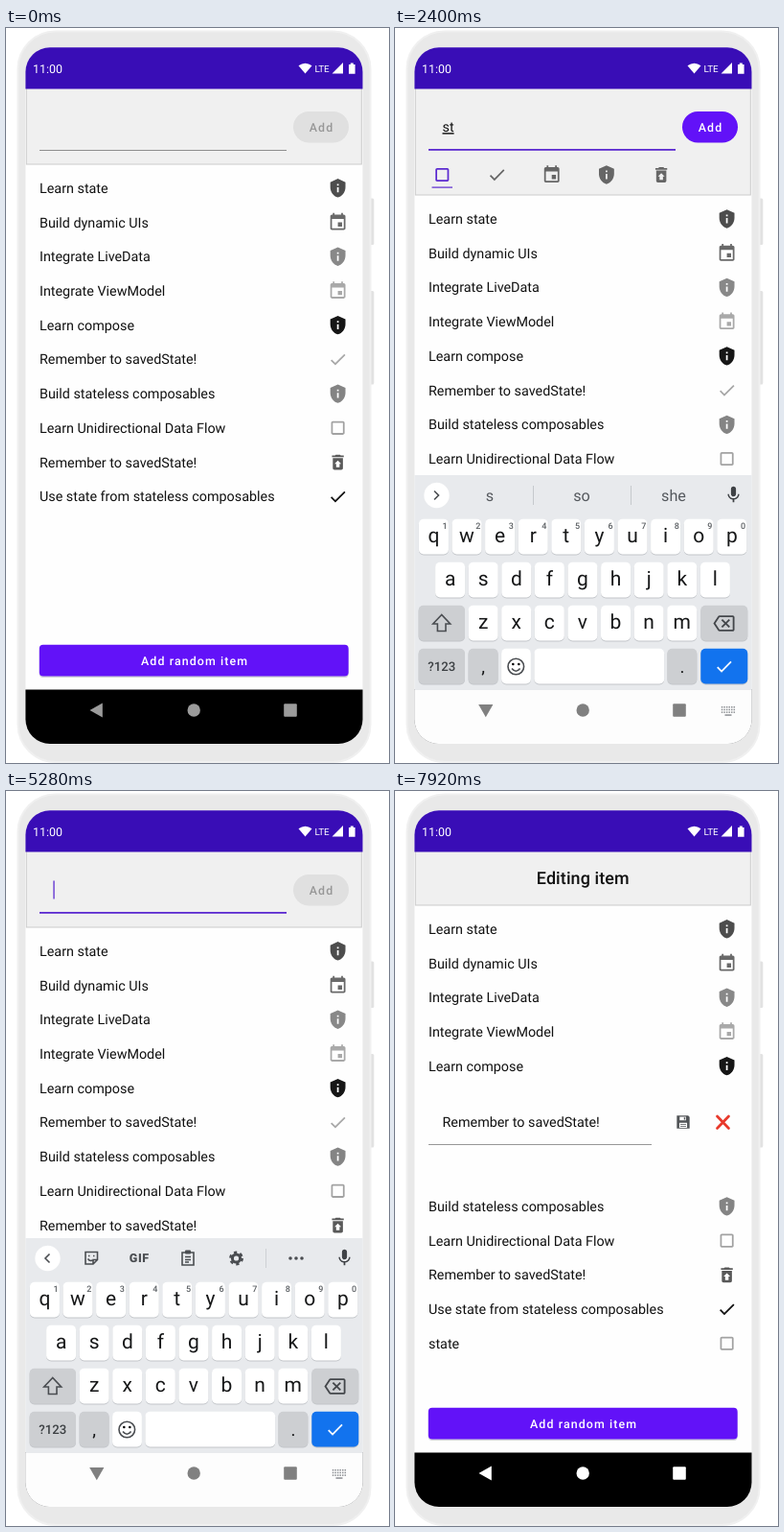
These frames come from a looping animation (400 by 766 pixels, 8 s). An HTML page:

```html
<!DOCTYPE html>
<html lang="en">
<head>
<meta charset="utf-8">
<title>Todo list</title>
<style>
  html, body { margin: 0; width: 100%; height: 100%; overflow: hidden; background: #fff; }
  svg { display: block; width: 400px; height: 766px; }
  text { font-family: Roboto, "Noto Sans", sans-serif; white-space: pre; text-rendering: geometricPrecision; }
  .body { font-size: 14.35px; fill: #111; }
  .btn { font-size: 12.4px; font-weight: 500; letter-spacing: 1.1px; }
  .mid { text-anchor: middle; }
  .key { font-size: 21px; fill: #161718; }
  .num { font-size: 9px; font-weight: 500; fill: #5c6064; }
  .hint { font-size: 16.2px; fill: #55595e; }
  .line { fill: none; stroke: #4a4d51; stroke-width: 1.6; }
  #typed { text-decoration: underline; }
</style>
</head>
<body>
<svg id="stage" viewBox="0 0 400 766" xmlns="http://www.w3.org/2000/svg"></svg>
<script>
const PURPLE = '#6212f8', ACCENT = '#5c2bd0', LOOP = 8000, STEP = 35.72;

const icons = {
  shield: 'M12 1L3 5v6c0 5.55 3.84 10.74 9 12 5.16-1.26 9-6.45 9-12V5l-9-4zm-1 6h2v2h-2V7zm0 4h2v6h-2v-6z',
  event: 'M17 12h-5v5h5v-5zM16 1v2H8V1H6v2H5c-1.11 0-1.99.9-1.99 2L3 19c0 1.1.89 2 2 2h14c1.1 0 2-.9 2-2V5c0-1.1-.9-2-2-2h-1V1h-2zm3 18H5V8h14v11z',
  done: 'M9 16.2L4.8 12l-1.4 1.4L9 19 21 7l-1.4-1.4L9 16.2z',
  square: 'M18 4H6c-1.1 0-2 .9-2 2v12c0 1.1.9 2 2 2h12c1.1 0 2-.9 2-2V6c0-1.1-.9-2-2-2zm0 14H6V6h12v12z',
  trash: 'M19 4h-3.5l-1-1h-5l-1 1H5v2h14V4zM6 7v12c0 1.1.9 2 2 2h8c1.1 0 2-.9 2-2V7H6zm8 7v4h-4v-4H8l4-4 4 4h-2z',
  save: 'M5 3h14l2 2v16H3V3zM7 4.5v5h9v-5zM13 5.5h2v3h-2zM6.5 13v7h11v-7zM8 15h8v1H8zM8 17.5h8v1H8z',
  mic: 'M12 14c1.66 0 3-1.34 3-3V5c0-1.66-1.34-3-3-3S9 3.34 9 5v6c0 1.66 1.34 3 3 3zm5.3-3c0 3-2.54 5.1-5.3 5.1S6.7 14 6.7 11H5c0 3.41 2.72 6.23 6 6.72V21h2v-3.28c3.28-.48 6-3.3 6-6.72h-1.7z',
  erase: 'M22 3H7c-.69 0-1.23.35-1.59.88L0 12l5.41 8.11c.36.53.9.89 1.59.89h15c1.1 0 2-.9 2-2V5c0-1.1-.9-2-2-2zm0 16H7.07L2.4 12l4.66-7H22v14zm-11.59-2L14 13.41 17.59 17 19 15.59 15.41 12 19 8.41 17.59 7 14 10.59 10.41 7 9 8.41 12.59 12 9 15.59z'
};

const items = [
  ['Learn state', 'shield', '#4d4d4d'],
  ['Build dynamic UIs', 'event', '#696969'],
  ['Integrate LiveData', 'shield', '#888'],
  ['Integrate ViewModel', 'event', '#a9a9a9'],
  ['Learn compose', 'shield', '#161616'],
  ['Remember to savedState!', 'done', '#a8a8a8'],
  ['Build stateless composables', 'shield', '#848484'],
  ['Learn Unidirectional Data Flow', 'square', '#a2a2a2'],
  ['Remember to savedState!', 'trash', '#595959'],
  ['Use state from stateless composables', 'done', '#111'],
  ['state', 'square', '#a2a2a2']
];

// ---- drawing helpers ----
const icon = (name, x, y, fill, s = .88) =>
  `<path d="${icons[name]}" fill="${fill}" fill-rule="evenodd" transform="translate(${x - 12 * s} ${y - 12 * s}) scale(${s})"/>`;
const text = (x, y, str, cls, extra = '') => `<text x="${x}" y="${y}" class="${cls}" ${extra}>${str}</text>`;
const rect = (x, y, w, h, fill, r = 0, extra = '') =>
  `<rect x="${x}" y="${y}" width="${w}" height="${h}" rx="${r}" fill="${fill}" ${extra}/>`;
const keycap = (x, y, w, fill = '#fff', id = '') =>
  rect(x, y + 1, w, 36.6, '#c3c6ca', 5) + rect(x, y, w, 36.6, fill, 5, id && `id="key-${id}"`);

function letterRow(str, x0, y, nums) {
  return [...str].map((c, i) => {
    const x = x0 + i * 34.6;
    return keycap(x - 15.5, y, 31, '#fff', c) + text(x, y + 24.3, c, 'key mid') +
      (nums ? text(x + 11.7, y + 9.7, (i + 1) % 10, 'num mid') : '');
  }).join('');
}

function rows() {
  return items.map(([label, name, fill], i) =>
    `<g id="row${i}">${text(35, 5, label, 'body')}${icon(name, 346.6, 0, fill)}</g>`).join('');
}

function tabs() {
  return ['square', 'done', 'event', 'shield', 'trash'].map((name, i) =>
    icon(name, 49.3 + i * 57.2, 153, i ? '#666' : ACCENT)).join('') + rect(38.5, 165.5, 21.5, 1.2, ACCENT);
}

function toolbar() {
  return `<g id="tools">
    <path class="line" d="M45.5 482.5l-4.5 4.5 4.5 4.5"/>
    <path class="line" d="M83 480.5h12.5v8l-4.5 4.5H83zM95.500 488.500h-4.500v4.500M85.500 487.500q2 3 4.500 1.500"/>
    <path class="line" d="M86 484.500h1.500M91 484.500h1.500"/>
    ${text(139.3, 491, 'GIF', 'mid', 'font-size="12.500" font-weight="800" letter-spacing=".6" fill="#4a4d51"')}
    <path class="line" d="M184 481h12v13h-12zM187 485.500h6M187 488.500h6M187 491h4"/>${rect(187, 478.5, 6, 4, '#4a4d51', 1)}
    <circle class="line" cx="240.500" cy="487" r="4.100" style="stroke-width:3"/>
    <circle class="line" cx="240.500" cy="487" r="6.200" style="stroke-width:2.400" stroke-dasharray="3.240 3.250"/>
    ${rect(271, 477, 1, 20, '#cdd0d4')}
    ${[297, 303, 309].map(x => `<circle cx="${x}" cy="487" r="1.800" fill="#4a4d51"/>`).join('')}
  </g>`;
}

function hints() {
  return `<g id="hints"><path class="line" d="M41 482.500l4.500 4.500-4.500 4.500"/>
    ${[99, 195, 291].map((x, i) => text(x, 493, '', 'hint mid', `id="hint${i}"`)).join('')}
    ${rect(144, 477, 1, 20, '#c6c9cd')}${rect(246, 477, 1, 20, '#c6c9cd')}</g>`;
}

function keyboard() {
  const gray = '#cdcfd2';
  return `<g id="kb">${rect(20, 466, 354, 300, '#e8eaed')}${rect(20, 690, 354, 300, '#fdfdfd')}
    <circle cx="43.500" cy="487" r="13.200" fill="#fff"/>${toolbar()}${hints()}
    ${icon('mic', 353.5, 486.5, '#3f4246', .87)}
    ${letterRow('qwertyuiop', 40.4, 511.8, true)}${letterRow('asdfghjkl', 57.6, 556.8)}
    ${keycap(24.6, 601.8, 48.4, gray)}${letterRow('zxcvbnm', 92.1, 601.8)}${keycap(319.3, 601.8, 49, gray)}
    <path class="line" d="M48.700 611.500l-9 9.500h4.700v7.500h8.600v-7.500h4.700z"/>
    ${icon('erase', 343.5, 620.5, '#44474b', .92)}
    ${keycap(24.6, 646.8, 48.4, gray)}${text(48.7, 670, '?123', 'mid', 'font-size="13.200" font-weight="500" fill="#3c4043"')}
    ${keycap(76.6, 646.8, 31, gray)}${text(92.1, 671.5, ',', 'key mid', 'style="font-size:19px"')}
    ${keycap(111.1, 646.8, 30.8)}<circle class="line" cx="126.300" cy="665.500" r="8.300"/>
    <path class="line" d="M122 667.500q4.300 5.500 8.600 0"/><circle cx="123.300" cy="663" r="1.300"/><circle cx="129.300" cy="663" r="1.300"/>
    ${keycap(145.4, 646.8, 135.8)}
    ${keycap(284.4, 646.8, 31, gray)}${text(300, 671.5, '.', 'key mid', 'style="font-size:19px"')}
    ${keycap(319.3, 646.8, 49, '#1273ee')}${icon('done', 343.7, 665.5, '#fff', .88)}
    ${[0, 1, 2].map(r => [0, 1, 2, 3, 4, 5].map(c =>
      rect(340.8 + c * 2.55, 707 + r * 2.7, 1.5, 1.5, '#8d9094')).join('')).join('')}
    ${rect(344.5, 715.3, 7, 1.5, '#8d9094')}</g>`;
}

document.getElementById('stage').innerHTML = `
  <defs>
    <clipPath id="screen"><rect x="20.400" y="20.200" width="352.100" height="725.700" rx="25.500"/></clipPath>
    <clipPath id="rowClip"><rect x="21" y="327.500" width="351" height="35.700"/></clipPath>
    <clipPath id="addClip"><rect x="300" y="87" width="58" height="32.500" rx="16.200"/></clipPath>
  </defs>
  ${rect(379, 177.5, 5.3, 48.5, '#e2e2e2', 1.5)}${rect(379, 274, 5.3, 97.5, '#e2e2e2', 1.5)}
  ${rect(12.5, 3.5, 368, 761.5, '#e9e9e9', 39, 'stroke="#f0f0f0" stroke-width="2"')}
  <g clip-path="url(#screen)">
    ${rect(20, 20, 354, 728, '#fefefe')}
    <circle id="rowRipple" cx="120" cy="345" fill="#000" fill-opacity=".1" clip-path="url(#rowClip)"/>
    ${rows()}
    <rect id="head" x="21.300" y="60" width="350" fill="#f0f0f0" stroke="#cbcbcb"/>
    <g id="entry">
      <rect id="rule" x="35" width="258"/>
      <text id="typed" x="49.500" y="108.200" class="body"></text>
      <rect id="caret" y="93.500" width="1.300" height="19" fill="${ACCENT}"/>
      <rect id="addBox" x="300" y="87" width="58" height="32.500" rx="16.200"/>
      <circle id="addRipple" cx="329" cy="103" fill="#fff" fill-opacity=".28" clip-path="url(#addClip)"/>
      ${text(329.5, 107.8, 'Add', 'btn mid', 'id="addText"')}
      <g id="tabs">${tabs()}</g>
    </g>
    <g id="edit">
      ${text(196.3, 97.2, 'Editing item', 'mid', 'font-size="17.900" font-weight="500" letter-spacing=".13" fill="#111"')}
      ${text(49.5, 350.3, 'Remember to savedState!', 'body')}
      ${rect(35, 368, 233, 1, '#979797')}
      ${icon('save', 301, 345, '#505356', .74)}
      <path d="M336.500 339l12 12.500M348.500 339l-12 12.500" stroke="#e8392b" stroke-width="2.700" stroke-linecap="round"/>
    </g>
    ${rect(34.8, 645, 322.9, 32, '#d4d4da', 4)}${rect(34.8, 642.7, 322.9, 32.7, PURPLE, 4)}
    ${text(197.1, 664, 'Add random item', 'btn mid', 'fill="#fff"')}
    ${rect(20, 689.5, 354, 60, '#000')}
    ${keyboard()}
    <g id="nav">
      <path id="back" d="M87.500 711l13.300-7.600v15.200z"/>
      <circle cx="196.200" cy="711" r="6.700"/><rect x="290.200" y="704.200" width="13.600" height="13.600" rx="1"/>
    </g>
    ${rect(20, 20, 354, 43.5, '#390db6')}
    ${text(28, 46.7, '11:00', '', 'font-size="12.400" fill="#fff"')}
    <path d="M305.500 39.300q7-5 14 0l-7 8.200z" fill="#fff"/>
    ${text(322.6, 45.9, 'LTE', '', 'font-size="9.900" letter-spacing="-.3" fill="#fff"')}
    <path d="M352 36v11.500h-11.500zM358 38h1.800v-1.500h3V38h1.800v9.800H358z" fill="#fff"/>
  </g>`;

// ---- timeline ----
const el = id => document.getElementById(id);
const set = (id, attrs) => { for (const k in attrs) el(id).setAttribute(k, attrs[k]); };
const show = (id, on) => set(id, { opacity: +on });
const ramp = (t, a, b) => Math.min(1, Math.max(0, (t - a) / (b - a)));
const easeOut = p => 1 - (1 - p) ** 3;
const last = (list, t) => list.filter(e => e[0] <= t).pop();

const FOCUS = 120, ROW_ON = 1500, CLEAR = 4960, ROW_OFF = 5060, EDIT = 7800;
const typing = [[0, ''], [FOCUS, ''], [ROW_ON, 's'], [1880, 'st'], [2640, 'sta'], [3620, 'stat'], [3930, 'state'], [CLEAR, '']];
const guesses = [[0, 's so she'], [3000, 'sta stay start'], [3720, 'stat state stay'], [4080, 'state states statement']];
const presses = [['s', 1440], ['t', 1820], ['a', 2600], ['t', 3580], ['e', 3880]];
const widths = { '': 0, s: 7.4, st: 12.1, sta: 19.9, stat: 24.2, state: 31.8 };

function render(t) {
  const editing = t >= EDIT, focused = t >= FOCUS;
  const tabsOpen = t >= ROW_ON && t < ROW_OFF;
  const [since, word] = last(typing, t);

  // list
  const shift = editing ? -23 : tabsOpen ? 32.2 : 0;
  items.forEach((_, i) => {
    const y = 166.8 + i * STEP + shift + (editing && i > 5 ? 74.8 : 0);
    set('row' + i, { transform: `translate(0 ${y})` });
  });
  show('row5', !editing);
  show('row10', t >= CLEAR);
  const tap = ramp(t, 7420, EDIT);
  set('rowRipple', { r: tap > 0 && !editing ? 20 + 250 * easeOut(tap) : 0 });

  // header
  set('head', { height: (editing ? 119 : tabsOpen ? 174 : 142) - 60 });
  show('entry', !editing);
  show('edit', editing);
  set('rule', focused ? { y: 126, height: 1.8, fill: ACCENT } : { y: 127, height: 1, fill: '#8e8e8e' });
  el('typed').textContent = word;
  set('caret', { x: 49.4 + widths[word] });
  show('caret', focused && (t - since) % 1000 < 500);
  set('addBox', { fill: word ? PURPLE : '#e0e0e0' });
  set('addText', { fill: word ? '#fff' : '#979797' });
  const press = ramp(t, 4660, 4900);
  set('addRipple', { r: press && word ? 6 + 28 * press : 0 });
  set('tabs', { opacity: tabsOpen ? ramp(t, ROW_ON, ROW_ON + 300) ** 1.5 * (1 - ramp(t, CLEAR, CLEAR + 100)) : 0 });

  // keyboard slides and fades together with the navigation bar
  const opening = easeOut(ramp(t, 240, 600)), closing = ramp(t, 5790, 6160);
  const up = closing ? 1 - closing : opening;
  set('kb', { transform: `translate(0 ${208 * (1 - up)})`, opacity: up });
  const turn = closing ? 1 - ramp(t, 5790, 6220) : opening;
  set('back', { transform: `rotate(${-90 * turn} 94.8 711)` });
  const tone = closing ? 128 + 127 * ramp(closing, 0, .5) : 155 - 27 * opening;
  set('nav', { fill: `rgb(${tone},${tone},${tone})` });

  const hinted = ramp(t, 1640, 1760) * (1 - ramp(t, 5080, 5200));
  set('hints', { opacity: hinted });
  set('tools', { opacity: 1 - hinted });
  last(guesses, t)[1].split(' ').forEach((w, i) => { el('hint' + i).textContent = w; });
  for (const k of 'stae') {
    const down = presses.some(([c, at]) => c === k && t >= at && t < at + 130);
    set('key-' + k, { fill: down ? '#d3d6da' : '#fff' });
  }
}

const start = performance.now();
function frame() {
  render((performance.now() - start) % LOOP);
  requestAnimationFrame(frame);
}
frame();
</script>
</body>
</html>
```
